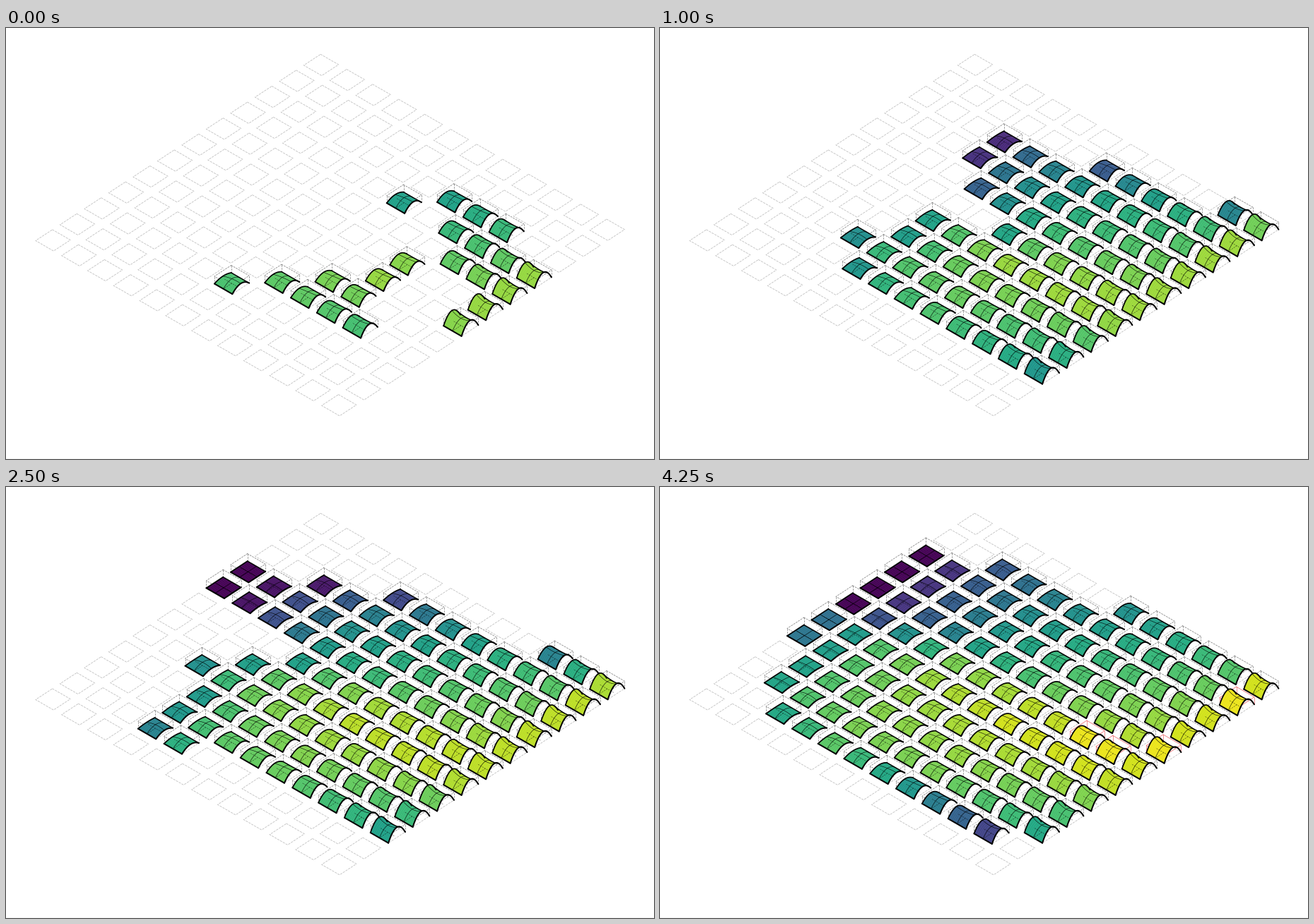
Animation of 917x611 px, one loop 7250 ms. Source, as a matplotlib script:

```python
import numpy as np
import matplotlib.pyplot as plt
from matplotlib.animation import FuncAnimation
from matplotlib.collections import PolyCollection

W, H, DPI = 917, 611, 64
N = 12
STEP, LOOP = 250, 7250
STARTS = [0, 500, 1000, 1500, 2000, 2500, 3250, 4250]
LAST = len(STARTS) - 1

# isometric grid: cell (i, j) runs right-down along U and left-down along V
ORIGIN = np.array([446.0, 52.4])
U = np.array([36.8, 21.25])
V = np.array([-34.5, 22.6])
SIZE = 0.69
BOX = 10.5
VIRIDIS = plt.get_cmap("viridis")
SOLID, DASH = "solid", (0, (3.2, 2.4))

# final fitness in percent at a few cells, bilinear in between
KEY_I = [0, 2, 4, 7, 10, 11]
KEY_J = [0, 4, 5, 6, 9, 10]
KEY_FITNESS = [[0, 28, 40, 56, 73, 93],
               [0, 30, 58, 77, 88, 93],
               [0, 50, 80, 90, 93, 93],
               [36, 73, 85, 93, 93, 91],
               [45, 72, 80, 80, 68, 60],
               [40, 60, 74, 53, 20, 15]]
BEST = {(11, 1), (9, 5), (10, 5), (11, 4)}

# first runs of filled cells: i from, to, j from, to
SEEDS = [(7, 9, 2, 2), (8, 10, 3, 3), (9, 10, 4, 4), (11, 11, 3, 6),
         (8, 8, 5, 7), (7, 7, 7, 7), (6, 9, 8, 8), (6, 6, 3, 3), (5, 5, 9, 9)]

# the filled region's edge at some stages, as (j, first i) corners
EDGES = {1: [(0, 12), (1, 7), (2, 4), (5, 8), (8, 4), (9, 5)],
         3: [(0, 9), (1, 6), (3, 1), (5, 4), (6, 3), (9, 3)],
         5: [(0, 9), (1, 4), (3, 0), (4, 0), (5, 4), (7, 2), (8, 3)],
         6: [(0, 6), (1, 2), (2, 0), (7, 0), (8, 1), (9, 1), (10, 2)]}


def fitness(i, j):
    column = [np.interp(i, KEY_I, row) for row in KEY_FITNESS]
    return np.interp(j, KEY_J, column)


def first_cell(stage, j):
    edge = [np.interp(j, *zip(*corners)) for corners in EDGES.values()]
    return int(np.interp(stage, list(EDGES), edge))


def last_cell(stage, j):
    return min(N - 1, 3 * stage + 7 - 18 * (j - 9))


def filled(stage):
    """Fitness of every filled cell; young cells at the edge lag behind."""
    if stage == 0:
        return {(i, j): fitness(i, j) - 9 for a, b, c, d in SEEDS
                for i in range(a, b + 1) for j in range(c, d + 1)}
    left = LAST - stage
    cells = {}
    for j in range(N - 1):
        lo = first_cell(stage, j)
        for i in range(lo, last_cell(stage, j) + 1):
            lag = 1.5 * left + 20 * min(1, left / 2) * np.exp(lo - i)
            cells[i, j] = max(fitness(i, j) - lag, 0)
    if stage == LAST:
        cells.update(dict.fromkeys(BEST, 97))
    return cells


def point(i, j, a, b, z=0):
    """Screen points of cell (i, j) at local coordinates a, b in 0..1."""
    a, b, z = np.broadcast_arrays(*(np.asarray(q, float) for q in (a, b, z)))
    p = ORIGIN + U * i + V * j
    p = p + (a[..., None] - 0.5) * SIZE * U + (b[..., None] - 0.5) * SIZE * V
    p[..., 1] -= z
    return p


def arch(i, a, b):
    """Domes for small i, flat at zero, turning into saddles for large i."""
    t = i / (N - 1)
    back, front = 14 * t ** 2, 14.5 * t ** 0.9
    bump = (3 - 7 * t * t) * min(1, i / 2)
    ridge = back + (front - back) * a + 4 * a * (1 - a) * bump
    return ridge * 4 * b * (1 - b)


class Scene:
    def __init__(self):
        self.items = []

    def line(self, pts, color, width, style=SOLID):
        self.items.append((pts, "none", color, width, style))

    def patch(self, pts, color):
        self.items.append((pts, color, color, 0.4, SOLID))

    def collection(self):
        verts, faces, edges, widths, styles = zip(*self.items)
        return PolyCollection(
            verts, closed=False, facecolors=faces, edgecolors=edges,
            linewidths=[w * 72 / DPI for w in widths],
            linestyles=list(styles), capstyle="round", joinstyle="round")


RING_A = np.array([0, 1, 1, 0, 0])
RING_B = np.array([0, 0, 1, 1, 0])
T = np.linspace(0, 1, 13)
FINE = np.linspace(0, 1, 41)


def box(scene, i, j, hot):
    look = ("#e8474c", 0.6, SOLID) if hot else ("#777777", 0.7, DASH)
    scene.line(point(i, j, RING_A, RING_B, BOX), *look)
    for a, b in ((0, 0), (1, 0), (0, 1)):
        scene.line(point(i, j, [a, a], [b, b], [0, BOX]), *look)


def tile(scene, i, j, value, hot):
    def surf(a, b):
        return point(i, j, a, b, arch(i, a, b))

    box(scene, i, j, hot)
    mesh = surf(T[:, None], FINE[None, :])
    far = (mesh @ np.array([U[1], -U[0]])).argmax(axis=1)
    rim = mesh[np.arange(len(T)), far]

    # only the side facing the viewer is filled
    color = VIRIDIS(value / 100)
    for k in range(len(T) - 1):
        scene.patch(np.concatenate([mesh[k, far[k]:],
                                    mesh[k + 1, far[k + 1]:][::-1]]), color)

    scene.line(surf(T, 0.5), "black", 0.55)
    scene.line(mesh[len(T) // 2, far[len(T) // 2]:], "black", 0.55)
    for a, b in (([0.1, 0.9], [0.5, 0.5]), ([0.5, 0.5], [0.5, 0.95])):
        scene.line(point(i, j, a, b), (0, 0, 0, 0.6), 0.6, DASH)

    scene.line(rim, "black", 1.5)
    scene.line(surf(0, T), "black", 1.7)
    scene.line(point(i, j, [0, 1], [1, 1]), "black", 2)
    scene.line(surf(1, T), "black", 2)


def build(stage):
    scene = Scene()
    for i in range(N):
        for j in range(N):
            scene.line(point(i, j, RING_A, RING_B), "#bdbdbd", 0.8, DASH)
    cells = filled(stage)
    for c in sorted(cells, key=lambda c: (sum(c), c)):
        tile(scene, *c, cells[c], stage == LAST and c in BEST)
    return scene.collection()


fig = plt.figure(figsize=(W / DPI, H / DPI), dpi=DPI, facecolor="white")
ax = fig.add_axes([0, 0, 1, 1])
ax.set(xlim=(0, W), ylim=(H, 0))
ax.axis("off")
ax.plot([0, W], [610, 610], color="#f6f6f6", lw=1)
layers = [ax.add_collection(build(s), autolim=False) for s in range(LAST + 1)]


def update(k):
    now = np.searchsorted(STARTS, k * STEP, side="right") - 1
    for n, layer in enumerate(layers):
        layer.set_visible(n == now)
    return layers


update(0)
anim = FuncAnimation(fig, update, frames=LOOP // STEP, interval=STEP,
                     repeat=True, repeat_delay=0, blit=False)
plt.show()
```
